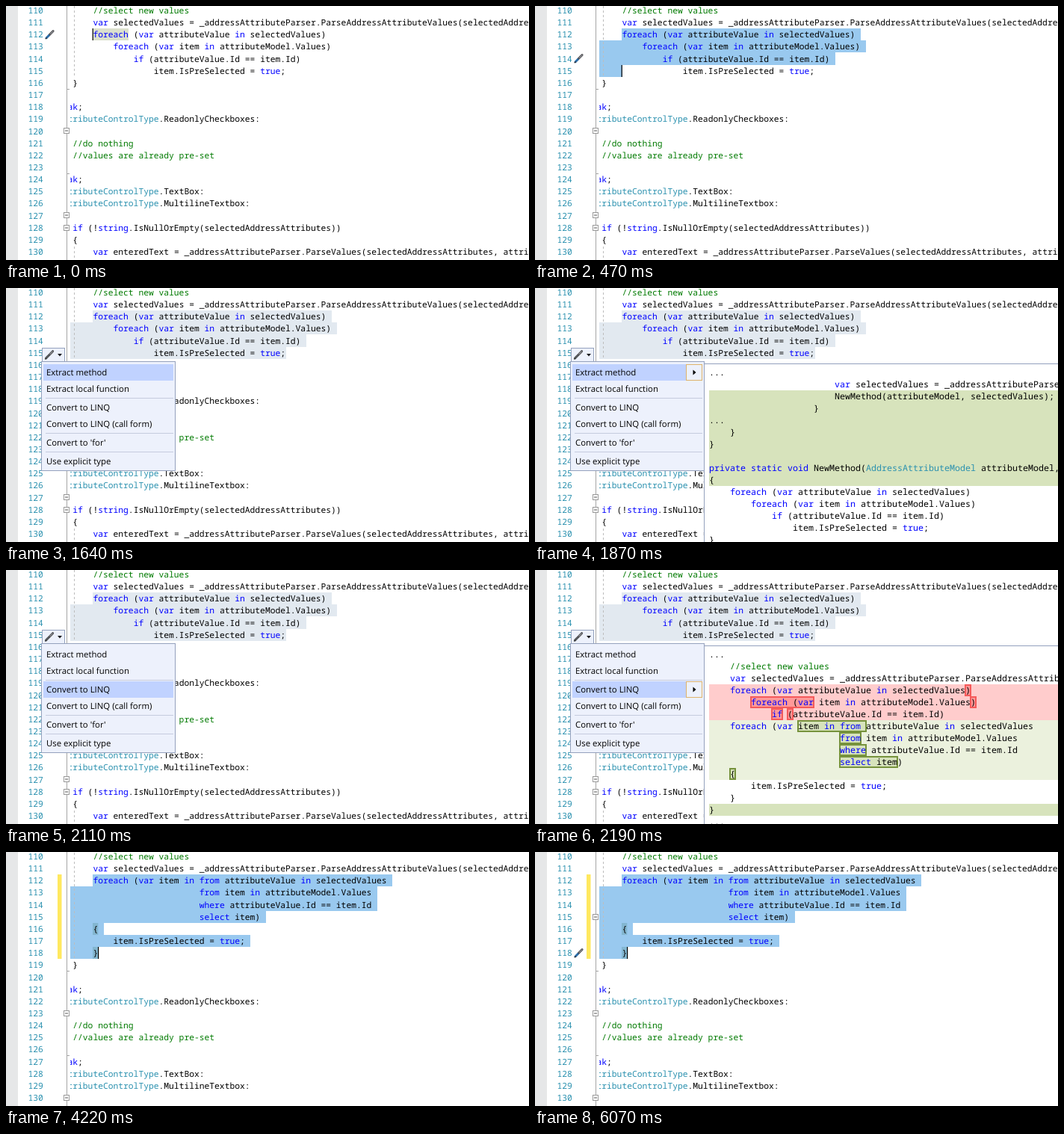
Write an HTML page that moves like this. It is 700 px wide and 340 px high and loops after 6390 ms.

```html
<!DOCTYPE html>
<html lang="en">
<head>
<meta charset="utf-8">
<title>Convert loop to LINQ</title>
<style>
html, body { margin: 0; width: 100%; height: 100%; overflow: hidden; background: #fff; }
svg { display: block; }
text { text-rendering: geometricPrecision; white-space: pre; }
.code { font: 500 11.3px "Noto Sans Mono", "DejaVu Sans Mono", monospace; }
.peek { font: 500 11.667px "Noto Sans Mono", "DejaVu Sans Mono", monospace; }
.menu { font: 11.4px "Open Sans", "Noto Sans", sans-serif; fill: #000; }
</style>
</head>
<body>
<svg id="stage" width="700" height="340" viewBox="0 0 700 340">
  <clipPath id="pane"><rect x="86" y="0" width="614" height="340"/></clipPath>
</svg>
<script>
const LOOP = 6390;
const KEYWORDS = new Set("foreach var in if true private static void from where select string ak".split(" "));
const TYPES = new Set(["tributeControlType", "AddressAttributeModel"]);
const QUERY = new Set(["from", "where", "select"]);
const BLUE = "#0000ff", TEAL = "#2b91af", GREEN = "#007a00";
const EDGE = "#94a1bd", MENU = "#edf1fc";
const stage = document.getElementById("stage");
const layers = [];

const col = c => 116.4 + 6.78 * c;
const rowTop = r => Math.round(-2.1 + 16.15 * r);
const base = r => Math.round(10 + 16.15 * r);

function add(parent, tag, attrs, content) {
  const node = document.createElementNS("http://www.w3.org/2000/svg", tag);
  for (const k in attrs) node.setAttribute(k, attrs[k]);
  if (content) node.textContent = content;
  parent.appendChild(node);
  return node;
}
const box = (g, x1, y1, x2, y2, fill, more) =>
  add(g, "rect", { x: x1, y: y1, width: x2 - x1, height: y2 - y1, fill, ...more });
const path = (g, d, more) => add(g, "path", { d, fill: "none", ...more });

// A group that is visible only during the given [from, to] spans.
function layer(...spans) {
  const g = add(stage, "g", {});
  if (spans.length) layers.push({ g, spans });
  return g;
}

function codeLine(g, cls, x, y, step, str, plain = new Set()) {
  const line = add(g, "text", { class: cls, y });
  for (const m of str.matchAll(/\/\/.*|\w+|[^\s\w]+/g)) {
    const w = m[0];
    const fill = w.startsWith("//") ? GREEN
      : TYPES.has(w) ? TEAL
      : KEYWORDS.has(w) && !plain.has(w) ? BLUE : "#000";
    add(line, "tspan", { x: x + m.index * step, fill }, w);
  }
}

// Rows of [column, text], starting at the given row.
function codeRows(g, start, rows, plain) {
  rows.forEach((r, i) => r && codeLine(g, "code", col(r[0]), base(start + i), 6.78, r[1], plain));
}

const head = [
  [0, "//select new values"],
  [0, "var selectedValues = _addressAttributeParser.ParseAddressAttributeValues(selectedAddressAttributes);"]
];
const loops = [
  [0, "foreach (var attributeValue in selectedValues)"],
  [4, "foreach (var item in attributeModel.Values)"],
  [8, "if (attributeValue.Id == item.Id)"],
  [12, "item.IsPreSelected = true;"]
];
const query = [
  [0, "foreach (var item in from attributeValue in selectedValues"],
  [21, "from item in attributeModel.Values"],
  [21, "where attributeValue.Id == item.Id"],
  [21, "select item)"],
  [0, "{"],
  [4, "item.IsPreSelected = true;"],
  [0, "}"]
];
const tail = [
  [-4, "}"], 0, [-5, "ak;"], [-5, "tributeControlType.ReadonlyCheckboxes:"], 0,
  [-4, "//do nothing"], [-4, "//values are already pre-set"], 0,
  [-5, "ak;"], [-5, "tributeControlType.TextBox:"], [-5, "tributeControlType.MultilineTextbox:"], 0,
  [-4, "if (!string.IsNullOrEmpty(selectedAddressAttributes))"], [-4, "{"],
  [0, "var enteredText = _addressAttributeParser.ParseValues(selectedAddressAttributes, attribute.Id);"]
];

function foldBox(g, r) {
  const y = Math.round(rowTop(r) + 8.2) + .5;
  box(g, 77.5, y - 4, 84.5, y + 3, "#fff", { stroke: "#999" });
  path(g, `M79 ${y - .5}H83`, { stroke: "#555" });
}
function foldTicks(g, ys) {
  for (const y of ys) path(g, `M81 ${y + .5}H85`, { stroke: "#a5a5a5" });
}
const guide = (g, y1, y2) =>
  path(g, `M91.5 ${y1}V${y2}`, { stroke: "#bdbdbd", "stroke-dasharray": "3 3" });

function screwdriver(g, x, y, tone) {
  const s = add(g, "g", { transform: `translate(${x} ${y})`, "stroke-linecap": "round" });
  path(s, "M-.5 .5L4.6 -4.8", { stroke: "#4a4a4e", "stroke-width": 3 });
  path(s, "M.8 -.8L4.4 -4.6", { stroke: "#c9ccd1", "stroke-width": .9 });
  path(s, "M-4.4 4.4L-1.4 1.4", { stroke: tone, "stroke-width": 3 });
  path(s, "M-5.4 5.4L-4 4.8", { stroke: "#333", "stroke-width": 1.4 });
}
function button(g, y, h, tone) {
  box(g, 48.5, y + .5, 78.5, y + h - .5, MENU, { stroke: EDGE });
  screwdriver(g, 58, y + h / 2, tone);
  path(g, `M69 ${y + h / 2 - 1.5}h6l-3 3.5z`, { style: "fill:#1b1b1f" });
}
const caret = (x, r, ...spans) =>
  box(layer(...spans), x, rowTop(r), x + 1.2, rowTop(r) + 16, "#000");

// Margins
const frame = layer();
box(frame, 0, 0, 16, 340, "#e6e7e8");
path(frame, "M81.5 0V340", { stroke: "#a5a5a5" });
for (let i = 0; i <= 20; i++)
  add(frame, "text", { class: "code", x: 29.5, y: base(i), fill: TEAL }, String(110 + i));

// Highlights and selections
box(layer([0, 230]), 116, 30, 164, 46, "#dbe0cc");
const ACTIVE = "#99c9ef", IDLE = "#e2e9f0";
const selRow = (g, i, end, fill) =>
  box(g, i ? 86 : 116, rowTop(i + 2), Math.ceil(col(end) + .3), rowTop(i + 3), fill);
const ends = [47, 48, 42, 38];
[230, 320, 470, 630].forEach((t, i) => selRow(layer([t, 1640]), i, ends[i], ACTIVE));
selRow(layer([470, 630]), 3, 0, ACTIVE);
const idle = layer([1640, 3820]);
ends.forEach((end, i) => selRow(idle, i, end, IDLE));

const selB = layer([3900, LOOP]);
[59, 56, 56, 34, 2, 31, 1].forEach((end, i) => selRow(selB, i, end, ACTIVE));
box(selB, 69, 30, 74.5, 143, "#ffe85f");
const braces = layer([4220, LOOP]);
for (const r of [6, 8]) box(braces, 116, rowTop(r), 123.3, rowTop(r + 1), "#83b6d0");

// Code before the change
const before = layer([0, 3820]);
const textA = add(before, "g", { "clip-path": "url(#pane)" });
codeRows(textA, 0, [...head, ...loops, ...tail]);
guide(before, 0, 95);
guide(before, 322, 340);
foldTicks(before, [111, 224]);
[10, 17, 18].forEach(r => foldBox(before, r));

// Code after the change; query keywords are coloured a little later
const after = layer([3820, LOOP]);
const textB = add(after, "g", { "clip-path": "url(#pane)" });
codeRows(textB, 0, head);
codeRows(textB, 9, tail.slice(0, 12));
foldTicks(after, [159, 272]);
[13, 20].forEach(r => foldBox(after, r));
codeRows(layer([3820, 4220]), 2, query, QUERY);
const coloured = layer([4220, LOOP]);
codeRows(coloured, 2, query);
guide(coloured, 1, 144);
foldBox(layer([5530, LOOP]), 5);

// Carets and quick action icons
caret(115.6, 2, [0, 230]);
caret(115.6, 3, [230, 320]);
caret(115.6, 4, [320, 470]);
caret(115.6, 5, [470, 630]);
caret(374.4, 5, [630, 1100]);
caret(123, 8, [3900, 4460], [5000, 5530], [6070, LOOP]);

const DARK = "#55585c", TONE = "#2a6ca8";
[[2, 0, 230, TONE], [3, 230, 320, TONE], [4, 320, 630, TONE], [5, 630, 1640, DARK], [8, 4680, LOOP, TONE]]
  .forEach(([r, a, b, tone]) => screwdriver(layer([a, b]), 58.5, rowTop(r) + 8.3, tone));
button(layer([3760, 3820]), 98, 21, TONE);

// Menu
const items = [
  [113, "Extract method"], [135, "Extract local function"], [160, "Convert to LINQ"],
  [182, "Convert to LINQ (call form)"], [207, "Convert to 'for'"], [232, "Use explicit type"]
];
const menu = layer([1640, 3760]);
button(menu, 80, 19, DARK);
box(menu, 47.5, 98.5, 226.5, 244.5, MENU, { stroke: EDGE });
for (const y of [147.5, 194.5, 219.5]) path(menu, `M53 ${y}H224`, { stroke: "#c5cbde" });
[[0, 1640, 2020], [1, 2020, 2105], [2, 2105, 3760]].forEach(([i, a, b]) =>
  box(layer([a, b]), 50, items[i][0] - 11, 224, items[i][0] + 11, "#c0d2ff"));
[[0, 1870, 2020], [2, 2190, 3760]].forEach(([i, a, b]) => {
  const g = layer([a, b]), y = items[i][0];
  box(g, 202.5, y - 10.5, 223.5, y + 10.5, MENU, { stroke: "#deb36a" });
  path(g, `M211.5 ${y - 3.5}v7l4-3.5z`, { style: "fill:#000" });
});
const labels = layer([1640, 3760]);
for (const [y, s] of items) add(labels, "text", { class: "menu", x: 54, y: y + 4 }, s);

// Previews
const px = c => 233 + 7 * c, py = r => 105 + 16 * r;
function preview(span, bands, marks, rows) {
  const g = layer(span);
  box(g, 226.5, 101.5, 710, 350, "#fff", { stroke: EDGE });
  for (const [a, b, fill] of bands) box(g, 233, py(a), 700, py(b), fill);
  for (const [r, a, b, fill, stroke] of marks)
    box(g, px(a), py(r) + 1, px(b), py(r + 1) - 1, fill, { stroke, "stroke-width": 2 });
  rows.forEach(([c, s], r) => codeLine(g, "peek", px(c), py(r) + 12, 7, s));
}
const shift = (rows, by) => rows.map(([c, s]) => [c + by, s]);
const ADDED = "#d7e3bc";

preview([1870, 2020], [[2, 10, ADDED]], [], [
  [0, "..."],
  [24, "var selectedValues = _addressAttributeParser.ParseAddressAttributeValues"],
  [24, "NewMethod(attributeModel, selectedValues);"],
  [20, "}"], [0, "..."], [4, "}"], [0, "}"], [0, ""],
  [0, "private static void NewMethod(AddressAttributeModel attributeModel,"],
  [0, "{"],
  ...shift(loops, 4),
  [0, "}"]
]);

const del = (r, a, b) => [r, a, b, "#ff9999", "#f55a5a"];
const ins = (r, a, b) => [r, a, b, ADDED, "#76923c"];
preview([2190, 3760],
  [[3, 6, "#ffcccc"], [6, 11, "#ebf1dd"], [13, 14, ADDED]],
  [del(3, 49, 50), del(4, 8, 20), del(4, 50, 51), del(5, 12, 14), del(5, 15, 16),
   ins(6, 17, 30), ins(7, 25, 29), ins(8, 25, 30), ins(9, 25, 36), ins(10, 4, 5)],
  [[0, "..."], ...shift(head, 4), ...shift(loops.slice(0, 3), 4),
   ...shift(query, 4), [0, "}"], [0, "..."]]);

function draw() {
  const t = performance.now() % LOOP;
  for (const { g, spans } of layers)
    g.style.display = spans.some(([a, b]) => t >= a && t < b) ? "" : "none";
  requestAnimationFrame(draw);
}
draw();
</script>
</body>
</html>
```
